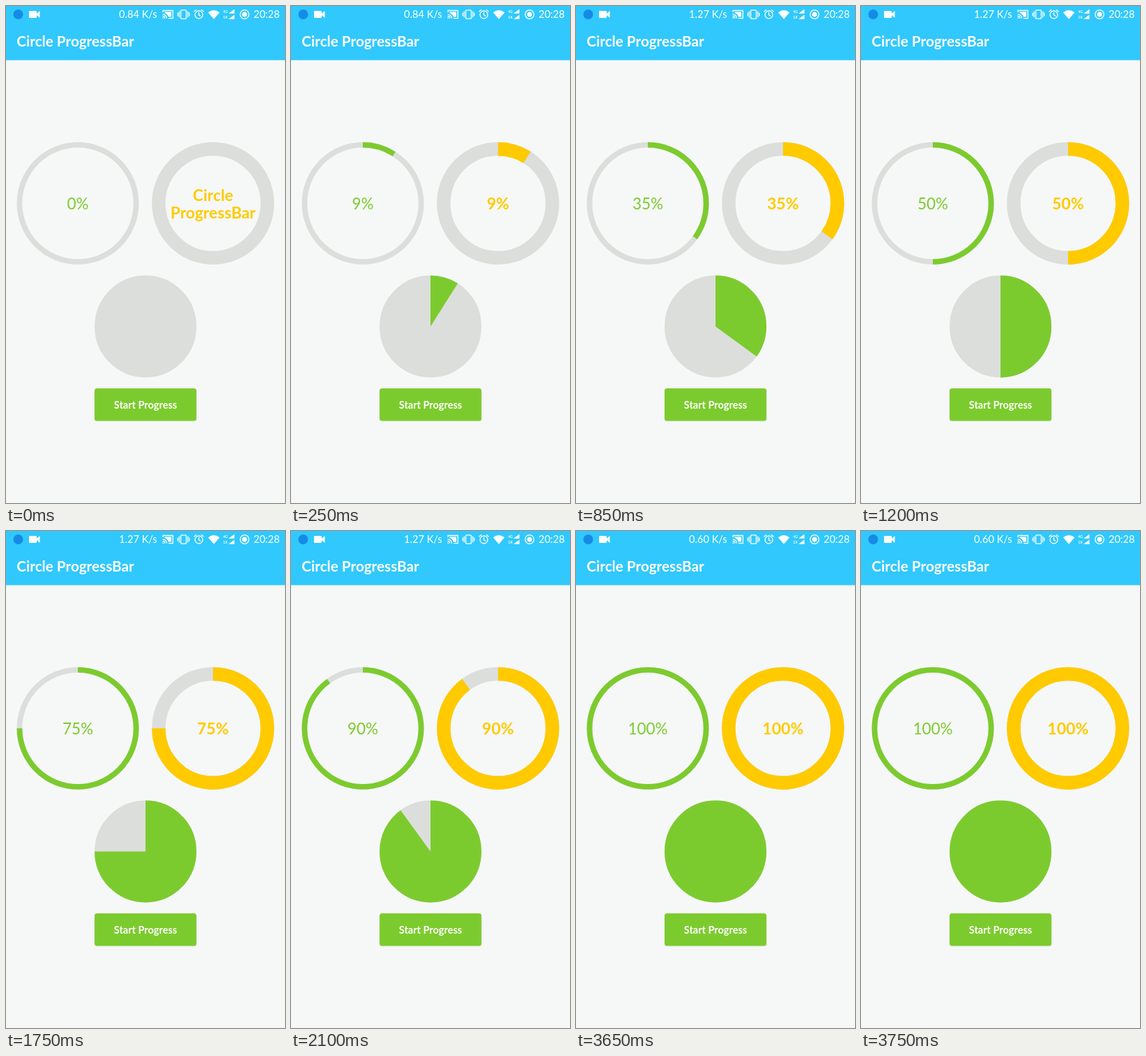
An HTML page for the animation above (3800 ms loop, 400 px wide and 711 px high).

```html
<!DOCTYPE html>
<html lang="en">
<head>
<meta charset="utf-8">
<title>Circle ProgressBar</title>
<style>
  html, body { margin: 0; width: 100%; height: 100%; overflow: hidden; background: #f6f8f7; }
  svg { display: block; width: 100%; height: 100%; }
  text { font-family: Lato, "Open Sans", sans-serif; }
  .bold { font-weight: 700; }
  .mid { text-anchor: middle; }
  .end { text-anchor: end; }
  .green { fill: #7ccb2e; }
  .yellow { fill: #ffca00; }
  .ring { fill: none; stroke: #dcdedc; }
  .arc { fill: none; stroke: #7ccb2e; stroke-dasharray: 0 100; }
  .arc.gold { stroke: #ffca00; }
  .line { fill: none; stroke: #fff; stroke-width: 1.3; }
</style>
</head>
<body>
<svg viewBox="0 0 400 711">
  <rect width="400" height="711" fill="#f6f8f7"/>
  <rect width="400" height="77.5" fill="#30c8fd"/>

  <g fill="#fff">
    <circle cx="17.5" cy="12" r="7" fill="#168be6"/>
    <path d="M34 7h9q1 0 1 1v2.8l4.5-3.8v10L44 13.200v2.800q0 1-1 1h-9q-1 0-1-1V8q0-1 1-1z"/>
    <text id="speed" class="end" x="216.700" y="17.200" font-size="14.600">0.84 K/s</text>

    <!-- cast -->
    <path class="line" d="M225 9V6.500h14.300v11.200H233M224.500 11.800a6 6 0 0 1 6 6M224.500 14.500a3.300 3.300 0 0 1 3.300 3.300"/>
    <path d="M227.500 8.500h9.500v7h-4.200a8 8 0 0 0-5.300-5.500zM224.500 16.300a1.800 1.800 0 0 1 1.800 1.800h-1.800z"/>

    <!-- vibrate -->
    <rect class="line" x="250.600" y="5.800" width="7.800" height="12.400" rx="1"/>
    <path class="line" d="M248.400 7.500v9M246.300 9.500v5M260.600 7.500v9M262.700 9.500v5"/>

    <!-- alarm -->
    <circle class="line" cx="276.500" cy="12.500" r="5.500"/>
    <path class="line" d="M276.500 9v3.800l2.600 1.600M269.500 8.300l3.600-3M283.500 8.300l-3.600-3"/>

    <!-- wifi and signal -->
    <path d="M289.800 9.200q8.200-6.600 16.400 0L298 18.800z"/>
    <text x="311.300" y="10.200" font-size="5" class="bold">4G</text>
    <text x="311.300" y="18.400" font-size="5" class="bold">1X</text>
    <path d="M319 10.700l8.500-6.200v6.200zM319 18.700l8.500-6.200v6.200z"/>

    <!-- record -->
    <circle class="line" cx="342" cy="12" r="6.300" stroke-width="1.700"/>
    <circle cx="342" cy="12" r="3.500"/>
    <text class="end" x="392.300" y="17.200" font-size="14.500">20:28</text>
    <text class="bold" x="15.300" y="58" font-size="20.700">Circle ProgressBar</text>
  </g>

  <g id="dials"></g>

  <text id="thin" class="mid green" x="103" y="291" font-size="22.500"></text>
  <text id="thick" class="mid bold yellow" x="296.800" y="291" font-size="23"></text>
  <g id="label" class="mid bold yellow" font-size="22.800">
    <text x="296.800" y="278.700">Circle</text>
    <text x="296.800" y="304">ProgressBar</text>
  </g>

  <rect x="126.500" y="547.500" width="147" height="47" rx="3.500" fill="#e5e9e2"/>
  <rect class="green" x="127" y="547" width="146" height="46.500" rx="3.500"/>
  <text class="mid bold" x="200" y="575.700" font-size="14.500" fill="#fff">Start Progress</text>
</svg>
<script>
const LOOP = 3800;
const $ = id => document.getElementById(id);

const dials = [
  { x: 103, y: 282.3, r: 83.6, w: 7.8, tone: '' },
  { x: 296.8, y: 282.3, r: 77.9, w: 19.5, tone: 'gold' },
  { x: 200, y: 458.5, r: 36.5, w: 73, tone: '' }
];
$('dials').innerHTML = dials.map(({ x, y, r, w, tone }) => {
  const circle = cls => `<circle class="${cls}" cx="${x}" cy="${y}" r="${r}" stroke-width="${w}"
    pathLength="100" transform="rotate(-90 ${x} ${y})"/>`;
  return circle('ring') + circle('arc ' + tone);
}).join('');
const arcs = document.querySelectorAll('.arc');

// Moments at which the screen refreshes
const ticks = [0, 50, 100, 200, 250, 350, 400, 500, 600, 650, 750, 800, 850, 950, 1050,
  1200, 1300, 1400, 1550, 1650, 1750, 1850, 1950, 2000, 2100, 2200, 2300, 2350];
// [time, percent]
const progress = [[0, 0], [50, 1], [500, 20], [850, 35], [1200, 50], [1750, 75], [2350, 100]];
const speeds = [[0, '0.84'], [700, '1.27'], [3650, '0.60']];

const latest = (list, t, key = v => v) => list.filter(v => key(v) <= t).pop();

function percentAt(time) {
  const t = latest(ticks, time);
  const i = progress.findIndex(([at]) => at >= t);
  if (i < 1) return 0;
  const [t0, p0] = progress[i - 1], [t1, p1] = progress[i];
  return Math.round(p0 + (p1 - p0) * (t - t0) / (t1 - t0));
}

function draw(time) {
  const p = percentAt(time);
  arcs.forEach(arc => { arc.style.strokeDasharray = p === 100 ? 'none' : `${p} 100`; });
  arcs.forEach(arc => { arc.style.visibility = p ? 'visible' : 'hidden'; });
  $('thin').textContent = p + '%';
  $('thick').textContent = p ? p + '%' : '';
  $('label').style.display = p ? 'none' : '';
  $('speed').textContent = latest(speeds, time, s => s[0])[1] + ' K/s';
}

const start = performance.now();
function frame() {
  draw((performance.now() - start) % LOOP);
  requestAnimationFrame(frame);
}
draw(0);
requestAnimationFrame(frame);
</script>
</body>
</html>
```
